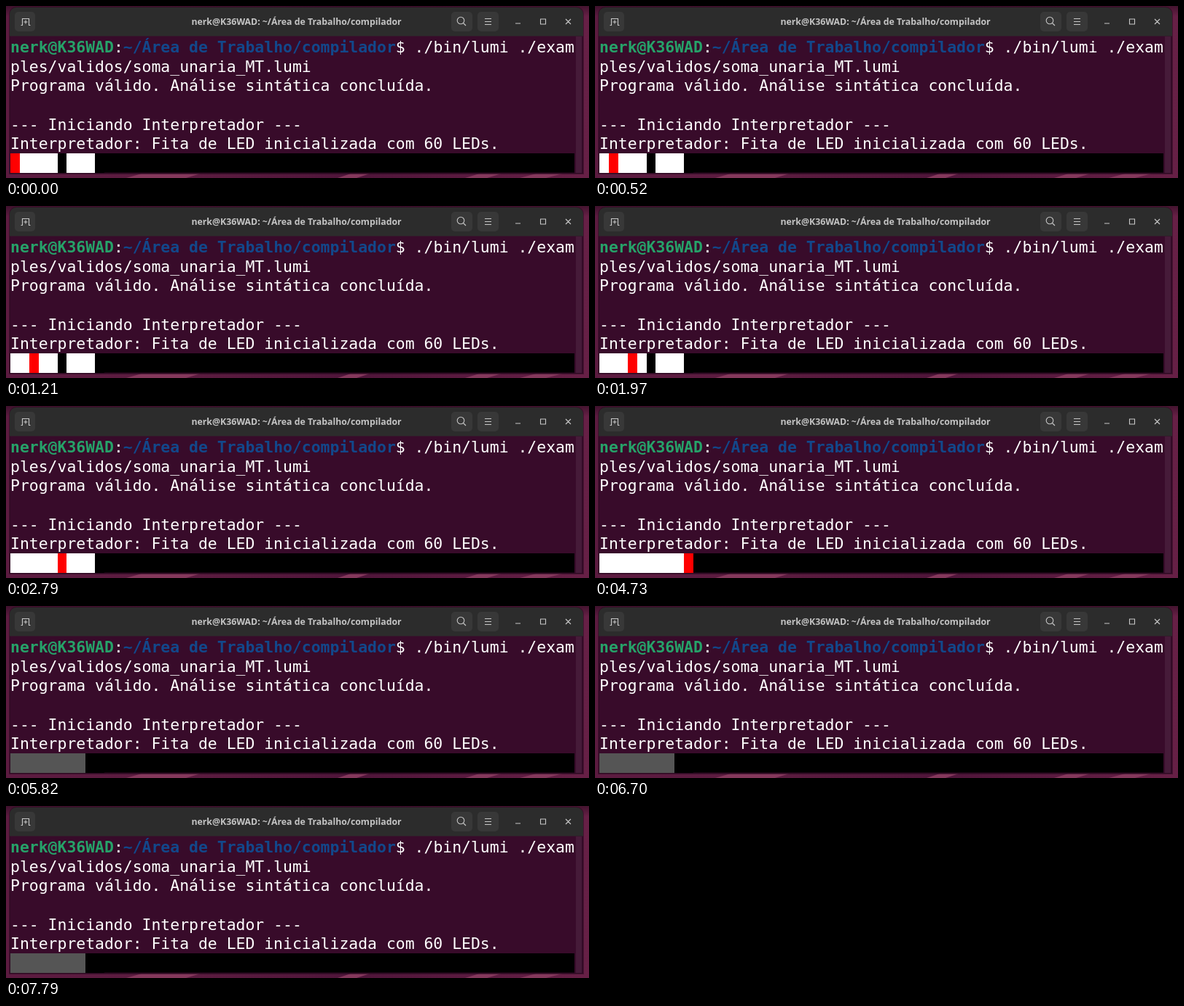
Recreate the animation shown at these times as an HTML page. Size 800 px wide and 237 px high, loop 7820 ms.

```html
<!DOCTYPE html>
<html lang="pt">
<head>
<meta charset="utf-8">
<style>
html, body { margin: 0; width: 100%; height: 100%; overflow: hidden; background: #541a3c; }
svg { display: block; }
.term { font: 21.43px "DejaVu Sans Mono", monospace; fill: #fff; }
.title { font: bold 12.3px "Open Sans", sans-serif; fill: #c4c4c4; text-anchor: middle; }
.b { font-weight: bold; }
.icon { fill: none; stroke: #c8c8c8; stroke-width: 1.1; }
</style>
</head>
<body>
<svg width="800" height="237" viewBox="0 0 800 237">
  <defs>
    <linearGradient id="wall" x1="0" y1="0" x2="1" y2="0">
      <stop offset="0" stop-color="#5c1b40"/>
      <stop offset=".3" stop-color="#5c1c40"/>
      <stop offset=".6" stop-color="#4f153a"/>
      <stop offset="1" stop-color="#672046"/>
    </linearGradient>
    <linearGradient id="shade" x1="0" y1="0" x2="0" y2="1">
      <stop offset="0" stop-color="#200818" stop-opacity=".5"/>
      <stop offset=".06" stop-color="#200818" stop-opacity="0"/>
    </linearGradient>
  </defs>

  <!-- Desktop -->
  <rect width="800" height="237" fill="url(#wall)"/>
  <path d="M165 237l28-8h80l-26 8zM455 237l24-8h26l-24 8zM630 237l26-8h30l-26 8zM705 237l30-8h36l-30 8z" fill="#84385c"/>
  <rect width="800" height="237" fill="url(#shade)"/>

  <!-- Window -->
  <path d="M5 231V11a9 9 0 0 1 9-9H783a9 9 0 0 1 9 9V231z" fill="#380b2a" stroke="#2a0a20" stroke-opacity=".55" stroke-width="2"/>
  <path d="M5 41.5V11a9 9 0 0 1 9-9H783a9 9 0 0 1 9 9V41.5z" fill="#2c2c2c"/>
  <rect x="782" y="42" width="8" height="188" fill="#461b39"/>
  <g fill="#383838">
    <rect x="12" y="8" width="28" height="27" rx="5"/>
    <rect x="611" y="8" width="29" height="27" rx="5"/>
    <rect x="647" y="8" width="29" height="27" rx="5"/>
  </g>
  <g class="icon">
    <path d="M20.5 26.5h2v-9h9v9h2M27 19.5v5M24.5 22h5"/>
    <circle cx="624" cy="20" r="4.8"/>
    <path d="M627.5 23.5l3.5 3.5M657 17.5h9M657 21.5h9M657 25.5h9"/>
    <path d="M699 24h7M733.5 18h7v7h-7zM768 18l7 7M775 18l-7 7"/>
  </g>
  <text class="title" x="398.5" y="25.6">nerk@K36WAD: ~/Área de Trabalho/compilador</text>

  <!-- Terminal -->
  <g class="term">
    <text x="6" y="64.2"><tspan class="b" fill="#26a269">nerk@K36WAD</tspan>:<tspan class="b" fill="#12488b">~/Área de Trabalho/compilador</tspan>$ ./bin/lumi ./exam</text>
    <text x="6" y="90.8">ples/validos/soma_unaria_MT.lumi</text>
    <text x="6" y="117.4">Programa válido. Análise sintática concluída.</text>
    <text x="6" y="170.6">--- Iniciando Interpretador ---</text>
    <text x="6" y="197.2">Interpretador: Fita de LED inicializada com 60 LEDs.</text>
  </g>
  <rect x="6" y="203" width="774" height="26.6"/>
  <g id="tape" shape-rendering="crispEdges"></g>
</svg>
<script>
const LOOP = 7820, STEP = 500, CELL = 12.9;
const tape = document.getElementById("tape");
const cells = Array.from({ length: 10 }, (_, i) => {
  const cell = document.createElementNS("http://www.w3.org/2000/svg", "rect");
  const attrs = { x: 6 + i * CELL, y: 203, width: CELL, height: 26.6 };
  for (const key in attrs) cell.setAttribute(key, attrs[key]);
  return tape.appendChild(cell);
});

// Unary addition: fill the gap at 5, run past the end, step back and erase the last mark.
function color(i, step) {
  if (step > 10) return i < 8 ? "#555" : "#000";
  const head = step < 10 ? step : 8;
  if (i === head) return "#f00";
  const marked = i < 9 && (i !== 5 || step > 5);
  return marked ? "#fff" : "#000";
}

function draw(now) {
  const step = Math.floor((now % LOOP) / STEP);
  cells.forEach((cell, i) => cell.setAttribute("fill", color(i, step)));
  requestAnimationFrame(draw);
}
draw(performance.now());
</script>
</body>
</html>
```
